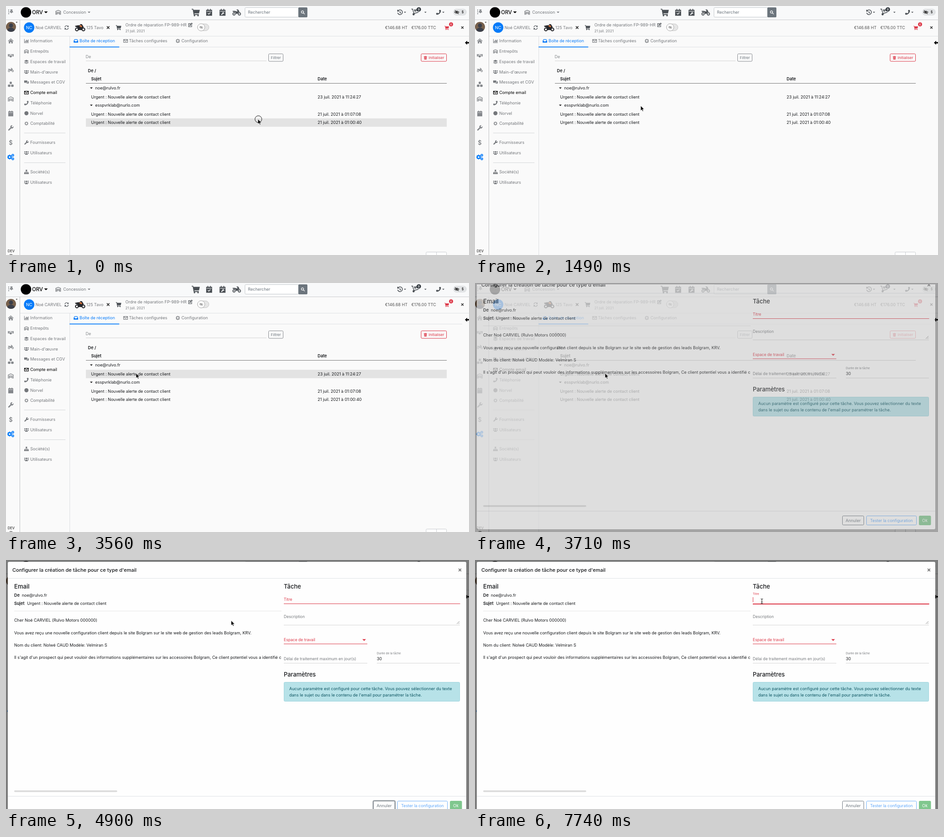
Animation, 1020 px wide and 549 px high, one loop 8000 ms. Source, as an HTML page:

```html
<!DOCTYPE html>
<html lang="fr">
<head>
<meta charset="utf-8">
<title>Compte email</title>
<style>
html, body { margin: 0; width: 100%; height: 100%; overflow: hidden; background: #fafafa; }
svg { display: block; width: 100vw; height: 100vh; font-family: Inter, "Open Sans", sans-serif; }
text { white-space: pre; }
</style>
</head>
<body>
<svg id="stage" viewBox="0 0 1020 549"></svg>
<script>
const INK = '#16181b', GREY = '#74777b', PALE = '#84878b', DARK = '#4a4f54', BLUE = '#067bf9', RED = '#dc3545';

// Icons on a 16 unit grid; a leading ~ means stroked
const ICONS = {
  cart: 'M0 1h3l.6 2H16l-1.6 7H5.3l.3 1.4H14V13H4L2 2.5H0ZM4 14.3a1.5 1.5 0 1 0 3 0 1.5 1.5 0 1 0-3 0ZM11 14.3a1.5 1.5 0 1 0 3 0 1.5 1.5 0 1 0-3 0Z',
  dolly: 'M0 1h3.5L6 10.5 15.5 8l.5 1.5-9 2.6A2.3 2.3 0 1 1 4.6 11L2.3 2.5H0ZM6 3l3-.8 1.3 4.7-3 .8ZM10 2l3-.8 1.3 4.7-3 .8Z',
  cal: 'M1 2h3V0h2v2h4V0h2v2h3v14H1ZM2 5v1.2h12V5Z',
  calCheck: 'M1 2h3V0h2v2h4V0h2v2h3v14H1ZM2 5v1.2h12V5ZM4.5 10.5l1-1 1.8 1.8 3.2-3.2 1 1-4.2 4.2Z',
  calWrench: 'M1 2h3V0h2v2h4V0h2v2h3v14H1ZM2 5v1.2h12V5ZM4.5 13l3.5-3.5a2 2 0 0 1 3-2L9.7 8.8l1 1L12 8.5a2 2 0 0 1-2.5 2.7L6 14.5Z',
  moto: 'M0 11a3 3 0 1 0 6 0 3 3 0 1 0-6 0ZM1.5 11a1.5 1.5 0 1 0 3 0 1.5 1.5 0 1 0-3 0ZM10.5 11a3 3 0 1 0 6 0 3 3 0 1 0-6 0ZM12 11a1.5 1.5 0 1 0 3 0 1.5 1.5 0 1 0-3 0ZM0 5h5l2 1h3L9.5 4 8 3.5V2.5h3L14 7l-2 .5L9.5 11H7L5.5 7.8 1 7Z',
  search: '~M11 6.5a4.5 4.5 0 1 0-9 0 4.5 4.5 0 1 0 9 0M10 10l5 5',
  hist: '~M3 4.5A6 6 0 1 1 2.2 9M2 1.5v3.5h3.5M8 5v3.5l2.5 1.5',
  phone: 'M11 0l4.5 1C16 9.5 9.5 16 1 15.5L0 11l4-1.8 2 2.2C8.6 10 10 8.6 11.4 6L9.2 4Z',
  eye: '~M1 8Q8 1 15 8Q8 15 1 8M10 8a2 2 0 1 0-4 0 2 2 0 1 0 4 0M2 2l12 12',
  home: 'M8 1l8 7-1 1.2-7-6-7 6L0 8ZM8 4.5l5.5 4.7V15H9.5v-4h-3v4h-4V9.2Z',
  hands: 'M0 4h3v7H0ZM13 4h3v7h-3ZM4 4.5l4-.5-3 3.5 1 1L9 7l3 3.5-3 3-2 .3L4 11ZM9 4h3v5L9.5 6Z',
  boxes: 'M5 1l3-1 3 1v5L8 7 5 6ZM0 9l3.5-1L7 9v5l-3.5 1L0 14ZM9 9l3.5-1L16 9v5l-3.5 1L9 14Z',
  ware: '~M1 15V5l7-3 7 3v10M4 15V8h8v7M4 11.5h8',
  wrench: 'M1 12.5l6-6A4.5 4.5 0 0 1 13 .6L10.5 3l.6 2 2 .6L15.5 3A4.5 4.5 0 0 1 9.5 9l-6 6a1.8 1.8 0 0 1-2.5-2.5Z',
  gear: '~M12 8a4 4 0 1 0-8 0 4 4 0 1 0 8 0M8 1v3M8 12v3M1 8h3M12 8h3M3 3l2 2M11 11l2 2M3 13l2-2M11 5l2-2',
  chart: 'M0 1h1.5v12.5H16V15H0ZM3 8h2.4v4.5H3ZM6.5 4h2.4v8.5H6.5ZM10 6h2.4v6.5H10ZM13 3h2v9.5h-2Z',
  layers: 'M8 1l8 3.5-8 3.5-8-3.5ZM2 7l6 2.6L14 7l2 1-8 3.5L0 8ZM2 10.5l6 2.6 6-2.6 2 1L8 15l-8-3.5Z',
  users: 'M5 4.5a3 3 0 1 0 6 0 3 3 0 1 0-6 0ZM3 14c0-7 10-7 10 0ZM0 4a2 2 0 1 0 4 0 2 2 0 1 0-4 0ZM12 4a2 2 0 1 0 4 0 2 2 0 1 0-4 0ZM0 11c0-4 2-4.5 4-3.5L2.3 11ZM16 11c0-4-2-4.5-4-3.5l1.7 3.5Z',
  chat: 'M0 2h11v7H5l-3 2.5V9H0ZM12.5 5H16v7h-2v2.5L11 12H6l1.5-1.5h5Z',
  mail: '~M1 3h14v10H1ZM1 4l7 5 7-5',
  inbox: 'M3 2h10l3 6v6H0V8ZM4 4L2.2 8H5l1 2h4l1-2h2.8L12 4Z',
  site: 'M5.5 0h5v5H8.7v2H14v3h2v5h-5v-5h1.5V8.5H8.7V10h1.8v5h-5v-5h1.8V8.5H3.5V10H5v5H0v-5h2V7h5.3V5H5.5Z',
  trash: 'M1 2h4l1-1h4l1 1h4v2H1ZM2 5h12l-1 11H3ZM5 7v7h1V7ZM7.5 7v7h1V7ZM10 7v7h1V7Z',
  edit: '~M9 3H2v11h11V8M6 10l1-3 6-6 2 2-6 6Z',
  sync: '~M2 7a6 6 0 0 1 11-3M14 1v4h-4M14 9a6 6 0 0 1-11 3M2 15v-4h4',
  cross: '~M3 3l10 10M13 3L3 13',
  pin: '~M4 2h8M6 2v5l-3 3h10l-3-3V2M8 10v5'
};

// y is the middle of the capitals
const text = (x, y, s, fill = INK, size = 9.05, weight = 400, more = '') =>
  `<text x="${x}" y="${y + size * .36}" font-size="${size}" font-weight="${weight}" fill="${fill}" ${more}>${s}</text>`;
const mid = (x, y, s, fill, size, weight) => text(x, y, s, fill, size, weight, 'text-anchor="middle"');
const rect = (x, y, w, h, fill, more = '') =>
  `<rect x="${x}" y="${y}" width="${w}" height="${h}" fill="${fill}" ${more}/>`;
const frame = (x, y, w, h, color, fill = 'none', r = 2) =>
  rect(x + .5, y + .5, w - 1, h - 1, fill, `rx="${r}" stroke="${color}"`);
const dot = (x, y, r, fill, more = '') => `<circle cx="${x}" cy="${y}" r="${r}" fill="${fill}" ${more}/>`;
const path = (d, fill, more = '') => `<path d="${d}" fill="${fill}" ${more}/>`;
const caret = (x, y, w, fill) => path(`M${x - w / 2} ${y - w / 4}h${w}l${-w / 2} ${w / 2}Z`, fill);
const icon = (name, x, y, size, color = GREY, width = 1.8) => {
  const d = ICONS[name], line = d[0] === '~';
  const at = `transform="translate(${x - size / 2} ${y - size / 2}) scale(${size / 16})"`;
  return line ? path(d.slice(1), 'none', `${at} stroke="${color}" stroke-width="${width}"`)
              : path(d, color, `${at} fill-rule="evenodd"`);
};

const topBar = () => rect(0, 0, 1020, 30, '#f8f9fa') + rect(0, 30, 1020, 1, '#c9cbce') +
  [9, 13, 17].map(y => dot(6, y, .9, DARK)).join('') + icon('pin', 12, 12, 9, DARK) +
  dot(44, 14, 11.5, '#000') + text(57.5, 14, 'ORV', '#000', 11.3, 500) + caret(88, 14, 8, '#000') +
  icon('ware', 115, 14, 12) + text(126, 14, 'Concession', GREY) + caret(183, 14, 6, GREY) +
  icon('cart', 418, 14, 18, DARK) + icon('calCheck', 447.5, 14, 15, DARK) +
  icon('calWrench', 477, 14, 15, DARK) + icon('moto', 508, 14, 18, DARK) +
  frame(526, 3, 119, 22, '#c4c8cc', '#fff') + text(533, 14, 'Rechercher', '#6c757d') +
  rect(644, 3, 20, 22, '#6c757d', 'rx="2"') + icon('search', 654, 14, 9, '#fff', 2.4) +
  icon('hist', 868, 14, 14, DARK) + caret(879, 14, 5, DARK) +
  icon('dolly', 901, 13, 16, DARK) + dot(909.5, 7.5, 4.8, '#343a40') + mid(909.5, 7.5, '0', '#fff', 6, 600) + caret(924, 14, 5, DARK) +
  icon('phone', 953, 14, 11, DARK) + caret(963.5, 14, 5, DARK) +
  rect(985, 6, 30, 15, '#e1e3e5', 'rx="7.5"') + icon('eye', 993, 13.5, 11, '#333') + mid(1006, 13.5, '$', '#222', 7, 600);

const orderBar = () =>
  dot(11, 46, 11, '#77604c') + dot(11, 43, 4.5, '#3b3f4a') + path('M3 53.5C4 46 18 46 19 53.5A11 11 0 0 1 3 53.5Z', '#3b3f4a') + caret(23.5, 36, 4, '#222') +
  dot(51, 47.5, 11.5, BLUE) + mid(51, 47.5, 'NC', '#fff', 9.5) + text(65, 47.5, 'Noé CARVIEL', GREY) +
  icon('sync', 133.5, 47.5, 10, DARK) +
  icon('moto', 163, 47.5, 22, '#26272b') + path('M155 43l9-1 7 5-4 6h-7Z', '#26272b') + path('M161 44l4-2 3 3-2 2Z', '#d9733a') +
  text(177, 47.5, '125 Tavo', GREY) +
  icon('cross', 225, 47.5, 9, '#333', 3) + icon('cart', 248, 47.5, 12, DARK) +
  text(263, 42, 'Ordre de réparation FP-989-HR', GREY) + text(263, 55.5, '21 juil. 2021', GREY, 7.8) + icon('edit', 406, 42, 10, DARK) +
  frame(421.5, 39, 26, 16, '#c4c4c4', '#e6e6e6', 7.5) + dot(430, 47, 8, '#fff', 'stroke="#aaa"') + icon('eye', 430, 47, 9, '#777', 1.4) +
  text(835, 47.5, '€146.68 HT', '#555') + text(893, 47.5, '€176.00 TTC', '#555') +
  icon('cart', 971, 48, 10, RED) + dot(980.5, 40.5, 4.5, RED) + mid(980.5, 40.5, '6', '#fff', 6) +
  icon('cross', 1005.5, 47.5, 8, '#333', 3) + rect(31, 66, 989, 1, '#dfe1e4') +
  path('M1011 81l5-4.5v3h5v3h-5v3Z', '#000');

const rail = () => rect(30, 31, 1, 518, '#bfc1c4') +
  ['home', 'hands', 'moto', 'boxes', 'ware', 'cal', 'wrench'].map((name, i) => icon(name, 10.5, 77 + i * 32, 12.5, PALE)).join('') +
  mid(10.5, 301, '$', GREY, 13, 500) +
  icon('gear', 8, 333, 12, BLUE, 3) + icon('gear', 15, 329, 7, BLUE, 3) + icon('gear', 15, 337, 7, BLUE, 3) +
  mid(11.5, 540, 'DEV', '#333', 7.5, 500) + dot(11, 552, 4.5, 'none', 'stroke="#333"');

const MENU = [
  ['chart', 77, 'Information'], ['ware', 100, 'Entrepôts'], ['layers', 123, 'Espaces de travail'],
  ['users', 145.5, "Main-d'œuvre"], ['chat', 168, 'Messages et CGV'], ['mail', 191, 'Compte email'],
  ['phone', 214, 'Téléphonie'], ['', 236.5, 'Norvel'], ['gear', 259, 'Comptabilité'],
  ['wrench', 301, 'Fournisseurs'], ['users', 324, 'Utilisateurs'], ['site', 366, 'Société(s)'], ['users', 389, 'Utilisateurs']
];
const sidebar = () => rect(140, 67, 1, 482, '#dcdee1') + rect(40, 279.5, 91, 1, '#d5d7d9') + rect(40, 345, 91, 1, '#d5d7d9') +
  MENU.map(([name, y, label]) => {
    const color = name === 'mail' ? '#000' : GREY;
    return (name ? icon(name, 45, y, 10, color) : dot(45, y, 4.5, GREY)) + text(53.5, y, label, color);
  }).join('');

const SUBJECT = 'Urgent : Nouvelle alerte de contact client';
const MAILS = [[200.5, '23 juil. 2021 à 11:24:27'], [238.5, '21 juil. 2021 à 01:07:08'], [257, '21 juil. 2021 à 01:00:40']];
const inbox = () => rect(141, 90, 864, 1, '#dfe1e4') + rect(140, 89.5, 109.5, 1.8, BLUE) +
  icon('inbox', 154, 77, 10, BLUE) + text(162, 77, 'Boîte de réception', BLUE) +
  icon('mail', 263.5, 77, 10) + text(271, 77, 'Tâches configurées', GREY) +
  icon('gear', 378.5, 77, 11) + text(386.5, 77, 'Configuration', GREY) +
  text(175.5, 111.5, 'De', '#85888b') + rect(176, 120.5, 398, 1, '#d3d3d3') +
  frame(578, 105, 33, 17.5, '#85898e') + mid(594.5, 114, 'Filtrer', '#6c757d', 8.1) +
  frame(914, 105, 57, 17.5, RED) + icon('trash', 924, 114, 8, RED) + text(931, 114, 'Initialiser', RED, 8.2) +
  text(180.5, 142.5, 'De /', INK, 9.2, 600) + text(187.5, 161, 'Sujet', INK, 9.2, 600) + text(686.5, 161, 'Date', INK, 9.2, 600) +
  rect(176, 170, 795, 1, '#777') + rect(176, 0, 795, 18.5, '#e3e3e3', 'id="hover"') +
  [[181, 'noe@rulvo.fr'], [219, 'esspvrklab@nurlo.com']].map(([y, s]) => caret(188, y, 6, '#111') + text(196.5, y, s)).join('') +
  MAILS.map(([y, date]) => text(187.5, y, SUBJECT) + text(686.5, y, date)).join('') +
  frame(925, 542, 46, 20, '#c9ccd0', '#fff') + rect(948, 542, 1, 8, '#c9ccd0');

const LINES = [
  'Cher Noé CARVIEL (Rulvo Motors 000000)',
  'Vous avez reçu une nouvelle configuration client depuis le site Bolgram sur le site web de gestion des leads Bolgram, KRV.',
  'Nom du client: Nolwé CAUD Modèle: Velmiran S',
  "Il s'agit d'un prospect qui peut vouloir des informations supplémentaires sur les accessoires Bolgram, Ce client potentiel vous a identifié comme"
];
const dialog = () => rect(4, 4, 1010, 557, '#fefefe', 'rx="3"') +
  text(14, 22, "Configurer la création de tâche pour ce type d'email", INK, 11, 500) +
  icon('cross', 1000, 22, 9, '#777', 3.4) + rect(4, 40, 1010, 1, '#dee2e6') +
  text(18, 58, 'Email', INK, 13.2, 500) +
  text(18, 78, 'De', INK, 9.2, 600) + text(35, 78, 'noe@rulvo.fr') +
  text(18, 96, 'Sujet', INK, 9.2, 600) + text(46.5, 96, SUBJECT) + rect(18, 112, 589, 1, '#e6e6e6') +
  `<clipPath id="pane"><rect x="18" y="120" width="589" height="110"/></clipPath><g clip-path="url(#pane)">` +
  LINES.map((s, i) => text(18, 133 + i * 27.3, s)).join('') + '</g>' +
  rect(18, 508, 227, 3.5, '#dadada', 'rx="1.7"') +
  text(612, 58, 'Tâche', INK, 13, 500) + rect(612, 96, 388.5, 1, RED) +
  '<text id="label" x="612" fill="#dc3545">Titre</text>' + rect(612, 96, 0, 2, RED, 'id="ripple"') + rect(612, 82, 1, 11, RED, 'id="blink"') +
  text(612, 124.5, 'Description', GREY, 8.55) + rect(612, 143, 388, 1, '#d5d5d5') +
  path('M993 141l6-6M996.5 141l2.5-2.5', 'none', 'stroke="#777" stroke-width=".8"') +
  text(612, 176, 'Espace de travail', RED, 8.55) + caret(789, 176.5, 8, RED) + rect(612, 184.5, 184, 1, RED) +
  text(612, 218, 'Délai de traitement maximum en jour(s)', GREY, 8.6) + rect(612, 227, 184, 1, '#d5d5d5') +
  text(817, 205.5, 'Durée de la tâche', GREY, 6.35) + text(817, 218, '30', INK, 8.8) + rect(817, 227, 183, 1, '#d5d5d5') +
  text(612, 252.5, 'Paramètres', INK, 12.9, 500) + frame(612, 269, 388, 43, '#9fd5de', '#b7e2e8') +
  text(624, 284, 'Aucun paramètre est configuré pour cette tâche. Vous pouvez sélectionner du texte', '#0c5460') +
  text(624, 297.5, "dans le sujet ou dans le contenu de l'email pour paramétrer la tâche.", '#0c5460') +
  rect(4, 520.5, 1010, 1, '#dee2e6') +
  rect(808.5, 530.5, 49, 22, 'none', 'id="focus" rx="3" stroke="#6c757d" stroke-opacity=".6" stroke-width="2"') +
  frame(809, 531, 48, 21, '#6c757d') + mid(833, 541.5, 'Annuler', '#6c757d') +
  frame(862, 531, 111, 21, '#6fb0fa') + mid(917.5, 541.5, 'Tester la configuration', '#5ea7fa', 8.9) +
  rect(978, 531, 26.5, 21, '#80c78e', 'rx="2.5"') + mid(991, 541.5, 'Ok', '#fff', 9.2);

document.getElementById('stage').innerHTML =
  rect(0, 0, 1020, 549, '#fafafa') + topBar() + rail() + sidebar() + orderBar() + inbox() +
  rect(0, 0, 1020, 549, '#000', 'id="shade"') +
  '<clipPath id="view"><rect y="3" width="1020" height="546"/></clipPath>' +
  `<g clip-path="url(#view)"><g id="dialog">${dialog()}</g></g>` +
  '<g id="cursor">' + path('M0 0V10.8L2.5 8.5 4.3 12.3 6 11.5 4.3 7.8H7.7Z', '#000', 'id="arrow" stroke="#fff" stroke-width=".7"') +
  path('M-2.3-5.5Q0-5.5 0-4Q0-5.5 2.3-5.5M0-4.5V4.5M-2.3 5.5Q0 5.5 0 4Q0 5.5 2.3 5.5M-1.3 1.5h2.6', 'none', 'id="beam" stroke="#111"') +
  dot(1, 0, 7.5, 'none', 'id="ring" stroke="#111"') + '</g>';

const el = id => document.getElementById(id);
const set = (id, attrs) => { for (const k in attrs) el(id).setAttribute(k, attrs[k]); };
const show = (id, on) => { el(id).style.display = on ? '' : 'none'; };
const clamp = v => Math.min(1, Math.max(0, v));
const out = v => 1 - (1 - v) ** 2;
const smooth = v => v * v * (3 - 2 * v);

// Pointer legs: start tick, end tick, goal, easing
const LEGS = [
  [4, 10, 365, 220, v => v], [10, 12, 315, 203, v => v],
  [12, 18, 286.5, 199, out], [29, 36, 632, 91, smooth]
];
function pointer(n) {
  let x = 555, y = 249.5;
  for (const [a, b, gx, gy, ease] of LEGS) {
    const p = ease(clamp((n - a) / (b - a)));
    x += (gx - x) * p;
    y += (gy - y) * p;
  }
  return [x, y];
}

const LOOP = 8000, TICK = 148.6;
function draw(t) {
  const n = Math.floor((t + 20) / TICK);
  const [x, y] = pointer(n), open = n >= 25, fading = n === 25, focused = n >= 38;

  const seen = pointer(n - 1)[1];   // hover trails the pointer by one tick
  const row = MAILS.find(m => Math.abs(m[0] - seen) < 9.3);
  show('hover', row && !open);
  if (row) set('hover', { y: row[0] - 9.2 });

  show('shade', open);
  show('dialog', open);
  set('shade', { opacity: fading ? .35 : .5 });
  set('dialog', { opacity: fading ? .65 : 1, transform: `translate(0 ${fading ? -18 : n === 26 ? -.4 : 0})` });

  const p = smooth(clamp((n - 37.6) / 2.6)), size = 8.55 - 2.2 * p;
  set('label', { 'font-size': size, y: 87 - 12.7 * p + size * .36 });
  const w = 388.5 * out(clamp((n - 37.6) / 2.2));
  set('ripple', { x: 806.25 - w / 2, width: w });
  show('blink', focused && (n < 42 || n >= 45 && n < 49 || n >= 52));
  show('focus', !fading && !focused);

  const beam = open && x > 612 && y < 97;
  show('beam', beam);
  show('arrow', !beam);
  show('ring', n === 0 || n === 23 || n === 38);
  set('cursor', { transform: `translate(${x} ${y})` });
}

const start = performance.now();
(function tick() {
  draw((performance.now() - start) % LOOP);
  requestAnimationFrame(tick);
})();
</script>
</body>
</html>
```
